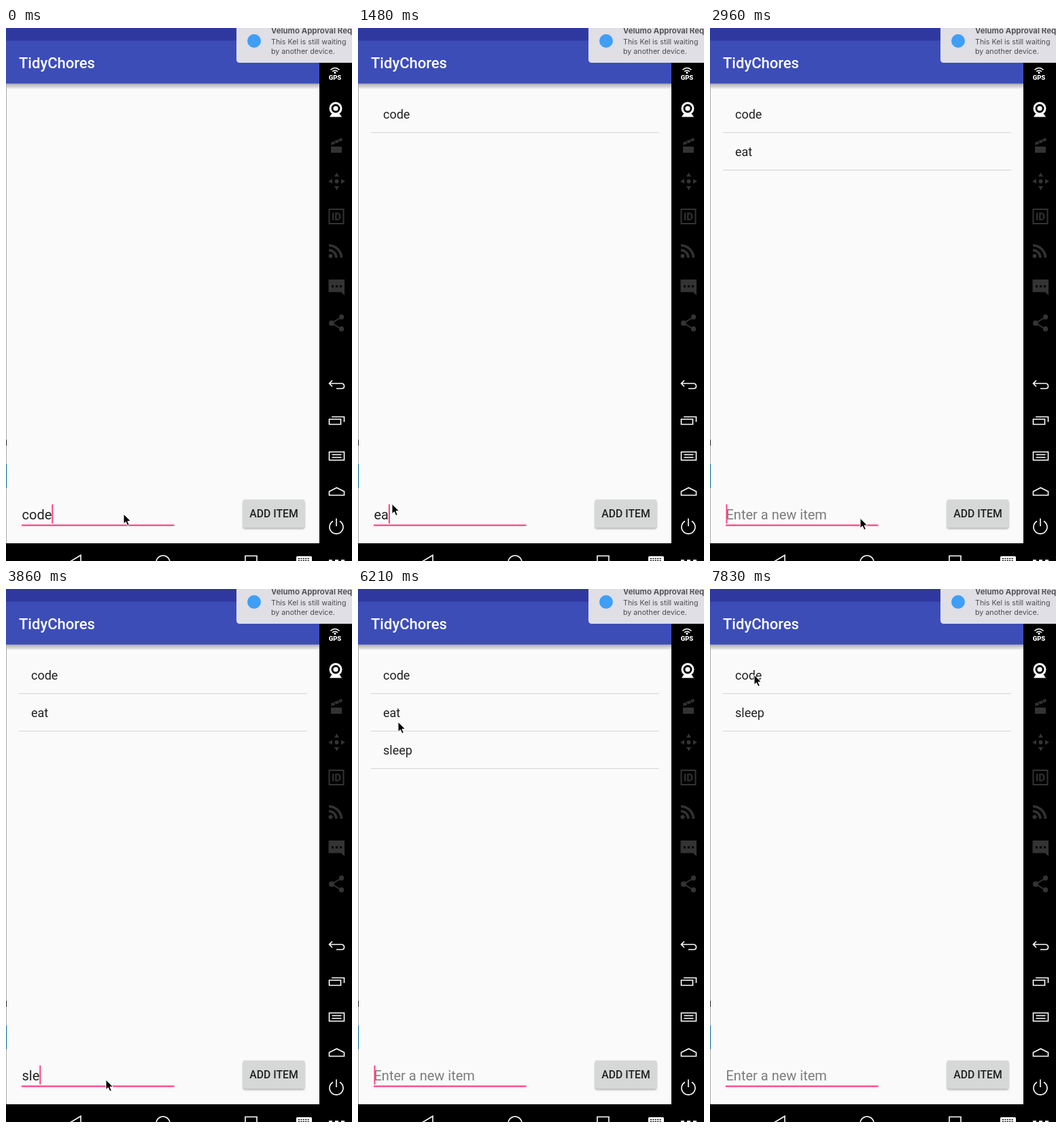
Write an HTML page that moves like this. It is 509 px wide and 782 px high and loops after 8 s.

```html
<!DOCTYPE html>
<html lang="en">
<head>
<meta charset="utf-8">
<style>
  html, body { margin: 0; width: 100%; height: 100%; overflow: hidden; background: #000; }
  svg { display: block; width: 509px; height: 782px; font-family: Roboto, sans-serif; }
  .note { font-family: Inter, sans-serif; font-size: 10.7px; fill: #4c4c50; }
  .icon { fill: none; stroke: #fff; stroke-width: 1.6; }
  .dim { fill: #333; }
  .dimline { fill: none; stroke: #333; }
</style>
</head>
<body>
<svg viewBox="0 0 509 782">
  <defs>
    <linearGradient id="fade" x2="0" y2="1">
      <stop stop-color="#aaa"/><stop offset="1" stop-color="#ececec"/>
    </linearGradient>
    <filter id="soft" x="-20%" y="-40%" width="140%" height="180%"><feGaussianBlur stdDeviation="1.5"/></filter>
    <filter id="wide" x="-20%" y="-40%" width="140%" height="180%"><feGaussianBlur stdDeviation="4"/></filter>
  </defs>

  <!-- app window -->
  <rect width="461" height="756" fill="#fafafa"/>
  <rect y="81" width="461" height="8" fill="url(#fade)"/>
  <rect y="18" width="461" height="63.5" fill="#3d4db7"/>
  <rect width="461" height="18.5" fill="#2f389e"/>
  <rect y="82" width="1" height="674" fill="#aaa"/>
  <rect y="640" width="1" height="35" fill="#05648f"/>
  <rect y="604" width="1" height="9" fill="#222"/>
  <text x="19" y="59" font-size="22" font-weight="500" fill="#fff">TidyChores</text>

  <g id="list" font-size="18" fill="#212121"></g>

  <!-- entry form -->
  <text id="entry" x="23.5" y="720.5" font-size="20"></text>
  <rect x="23" y="728.5" width="224.5" height="2.2" fill="#ff4081"/>
  <rect id="caret" y="699" width="2" height="28" fill="#ff4081"/>
  <rect id="shade" x="349" y="693.5" width="90" height="41" rx="2" fill="#000" opacity=".4" filter="url(#soft)"/>
  <rect id="button" x="349" y="692" width="90" height="41.5" rx="2"/>
  <text x="394" y="717.5" text-anchor="middle" font-size="15.8" font-weight="500" fill="#212121">ADD ITEM</text>

  <!-- navigation bar and side panel -->
  <path d="M0 756H461V0H509V782H0Z"/>
  <g class="icon" stroke-width="2">
    <path d="M94 783L110 773.5V783M352 783V774.5H369V783"/>
    <circle cx="231" cy="784" r="10"/>
  </g>
  <rect x="427" y="775" width="23" height="10" rx="1.5" fill="#fff"/>
  <path d="M430 778.5H447M430 781.5H447" stroke="#000" stroke-width="1.6" stroke-dasharray="2 1.4"/>
  <path d="M475 782H498" stroke="#fff" stroke-width="4" stroke-dasharray="5 4"/>

  <text x="484" y="75.5" text-anchor="middle" font-size="9.5" font-weight="900" fill="#fff">GPS</text>
  <path class="icon" d="M477.5 61.5Q484 55.500 490.500 61.500M480 64Q484 60.500 488 64"/>
  <circle cx="484" cy="65.5" r="1.5" fill="#fff"/>

  <circle cx="485" cy="118" r="8" fill="none" stroke="#fff" stroke-width="3"/>
  <circle cx="485" cy="118" r="3.6" fill="#fff"/>
  <path d="M479 126H491L494 130.500H476Z" fill="#fff"/>

  <path class="dim" d="M478 173H494V183H478ZM478 168L494 161L495 165L479 172Z"/>
  <path d="M482 165L485 170M488 162.500L491 167.500M478 173.500H494" stroke="#000"/>
  <circle class="dim" cx="486.500" cy="225" r="3"/>
  <path class="dim" d="M483 218L486.500 212L490 218ZM483 232L486.500 238L490 232ZM480 221.500L474 225L480 228.500ZM493 221.500L499 225L493 228.500Z"/>

  <rect class="dimline" x="475.500" y="266" width="21" height="21" stroke-width="2"/>
  <text class="dim" x="486" y="282" text-anchor="middle" font-size="15" font-weight="700">ID</text>

  <circle class="dim" cx="477.500" cy="334.500" r="3"/>
  <path class="dimline" stroke-width="3.500" d="M475 326A11 11 0 0 1 486 337M475 319A18.500 18.500 0 0 1 493.500 337"/>

  <path class="dim" d="M474.500 369H498V392L493 387.500H474.500Z"/>
  <path d="M479 379H495" stroke="#000" stroke-width="3" stroke-dasharray="3 3"/>

  <path class="dimline" stroke-width="2" d="M494 424L479 433L494 442"/>
  <g class="dim"><circle cx="479" cy="433" r="4"/><circle cx="493.500" cy="424" r="3.700"/><circle cx="493.500" cy="441.500" r="3.700"/></g>

  <g class="icon">
    <path d="M480 517L475.500 521.500L480 526M476 521.500H494Q497.500 522 497.500 525.500T494 529H486"/>
    <path d="M475.500 574H492.500V581.500H475.500ZM479 570.500H497.500V578"/>
    <path d="M475.500 622H497.500V634H475.500ZM479.500 626H493.500M479.500 630H493.500"/>
    <path d="M475.500 685.500V680L486.500 674.500L497.500 680V685.500Z"/>
    <path d="M481 723.500A10 10 0 1 0 491 723.500M486 719.500V731"/>
  </g>

  <!-- notification -->
  <path d="M339 0V46Q339 51 344 51H509V0Z" fill="#dfdfe5"/>
  <circle cx="365" cy="19" r="10" fill="#3f9ff5"/>
  <g class="note">
    <text x="390" y="8" font-size="11.500" font-weight="600">Velumo Approval Requ</text>
    <text x="390" y="24">This Kel is still waiting</text>
    <text x="390" y="38">by another device.</text>
  </g>

  <path id="mouse" d="M0 0V14.500L3.300 11.500L5.800 17L8.300 16L5.900 10.500H10.500Z" stroke="#fff" stroke-width="1"/>
</svg>
<script>
const $ = id => document.getElementById(id);
const LOOP = 8000, STEP = 148;

// [step, x, y]
const path = [
  [0, 173, 713], [4, 368, 706], [5, 368, 706], [8, 60, 705], [11, 45, 695],
  [12, 45, 690], [13, 300, 647], [14, 368, 670], [15, 369, 718], [18, 369, 718],
  [21, 147, 720], [29, 147, 720], [33, 375, 712], [34, 385, 713], [35, 385, 713],
  [36, 210, 480], [37, 58, 262], [39, 56, 215], [42, 59, 195], [50, 59, 190],
  [52, 56, 157], [53, 65, 126]
];
// [step, entry text]
const typing = [
  [0, 'code'], [5, ''], [9, 'e'], [10, 'ea'], [11, 'eat'], [18, ''],
  [24, 's'], [25, 'sl'], [26, 'sle'], [27, 'slee'], [28, 'sleep'], [35, '']
];
// [name, added, removed]
const items = [['code', 5, 99], ['eat', 18, 49], ['sleep', 35, 99]];
const caretOn = [[0, 2], [5, 8], [9, 13], [18, 21], [24, 31], [35, 38], [42, 45], [48, 51]];
const pressed = [[4, 6], [17, 19], [35, 36]];

const within = (spans, n) => spans.some(([a, b]) => n >= a && n < b);
const latest = (keys, n) => keys.filter(k => k[0] <= n).pop();

function position(n) {
  const a = latest(path, n), b = path.find(k => k[0] > n) || a;
  const p = a === b ? 0 : (n - a[0]) / (b[0] - a[0]);
  return [1, 2].map(i => a[i] + (b[i] - a[i]) * p);
}

function draw(n) {
  $('list').innerHTML = items.filter(([, a, b]) => n >= a && n < b).map(([name], i) =>
    `<text x="37" y="${133 + 55 * i}">${name}</text>
     <path d="M19 ${153.5 + 55 * i}H443" stroke="#d5d5d5"/>`).join('');

  const text = latest(typing, n)[1], entry = $('entry');
  entry.textContent = text || 'Enter a new item';
  entry.setAttribute('fill', text ? '#212121' : '#7c7c7c');
  $('caret').setAttribute('x', text ? 23.5 + entry.getComputedTextLength() : 23.5);
  $('caret').style.opacity = +within(caretOn, n);

  const down = within(pressed, n);
  $('button').setAttribute('fill', down ? '#d0d2d2' : '#d6d7d7');
  $('shade').setAttribute('y', down ? 695 : 693.5);
  $('shade').setAttribute('filter', `url(#${down ? 'wide' : 'soft'})`);
  $('mouse').setAttribute('transform', `translate(${position(n)})`);
}

let start, shown = -1;
function frame(now) {
  start ??= now;
  const n = Math.floor((now - start) % LOOP / STEP + 0.11);
  if (n !== shown) draw(shown = n);
  requestAnimationFrame(frame);
}
draw(0);
requestAnimationFrame(frame);
</script>
</body>
</html>
```
